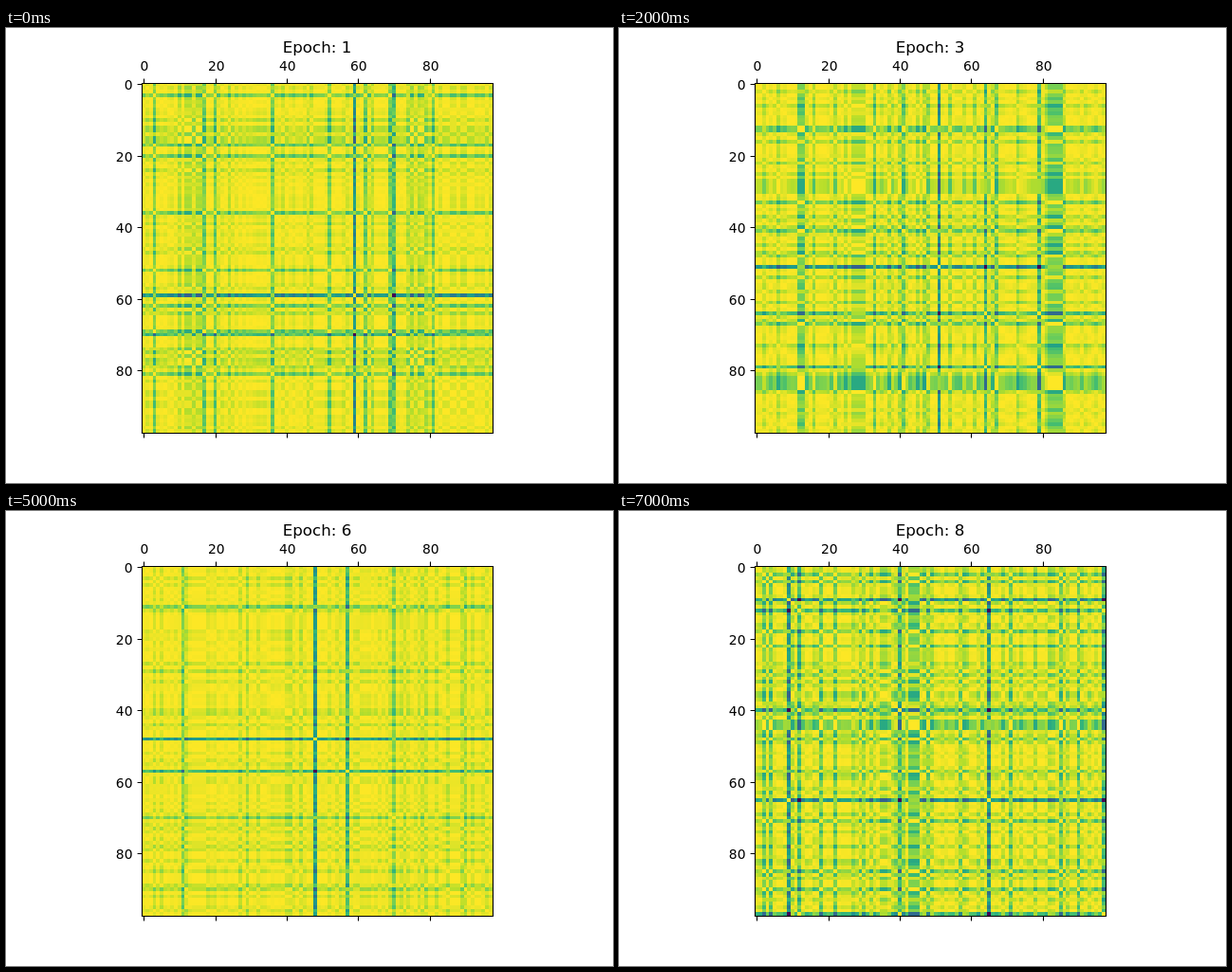
An HTML page with a canvas that plays this animation: 640x480 px, repeating every 8000 ms.

```html
<!DOCTYPE html>
<html lang="en">
<head>
<meta charset="utf-8">
<title>Similarity matrix by epoch</title>
<style>
  html, body { margin: 0; width: 100%; height: 100%; overflow: hidden; background: #fff; }
  canvas, svg { position: absolute; left: 0; top: 0; }
  text { font: 13.89px "DejaVu Sans", sans-serif; text-anchor: middle; }
  #title { font-size: 16.67px; }
  path { stroke: #000; stroke-width: 1.11; fill: none; }
</style>
</head>
<body>
<canvas id="matrix" width="640" height="480"></canvas>
<svg id="axes" width="640" height="480">
  <text id="title" x="328" y="26"></text>
  <path d="M143.5 58.5H513.5V427.5H143.5Z" stroke-linejoin="miter"/>
</svg>
<script>
const SIZE = 98, LEFT = 143.2, TOP = 57.6, CELL = 369.6 / SIZE, EPOCH_MS = 1000;
const VIRIDIS = ['440154', '482878', '3e4989', '31688e', '26828e',
                 '1f9e89', '35b779', '6ece58', 'b5de2b', 'fde725']
  .map(hex => hex.match(/../g).map(pair => parseInt(pair, 16)));

// Samples that stand out in each epoch, grouped by their offset in LEVELS
const LEVELS = [1, 0.55, -0.35, -0.75];
const EPOCHS = [
  { spread: 0.32, groups: [[59], [3, 17, 20, 36, 52, 62, 69, 81], [10, 12, 13, 15, 16, 75, 77], [70]] },
  { spread: 0.34, groups: [[22], [45, 73], [34, 88], [61]] },
  { spread: 0.42, groups: [[51], [12, 13, 33, 41, 67, 82, 83, 84, 85], [6, 25, 27, 28, 29, 30, 37, 86], [64, 79]] },
  { spread: 0.28, groups: [[14, 31], [20, 26, 42], [6, 25, 54, 62, 71, 75, 76, 83, 84, 92, 93, 94], [59]] },
  { spread: 0.36, groups: [[8, 59, 67], [16, 22, 33, 35, 71, 72, 73], [26, 39, 52, 78, 86, 91, 94], [97]] },
  { spread: 0.3, groups: [[48], [11, 70], [29, 90], [57]] },
  { spread: 0.26, groups: [[7, 79], [37, 51], [20, 26, 63, 91, 93, 94], [14, 67, 89]] },
  { spread: 0.42, groups: [[9, 65], [2, 4, 18, 22, 43, 44, 45, 71, 85, 90], [10, 35, 36, 47, 49, 58, 78, 82], [12, 40, 97]] }
];

function randomFrom(seed) {
  return () => {
    seed = (seed * 1664525 + 1013904223) >>> 0;
    return seed / 2 ** 32;
  };
}

function samplePositions(epoch) {
  const random = randomFrom(epoch * 7919 + 17);
  const { spread, groups } = EPOCHS[epoch];
  const positions = Array.from({ length: SIZE }, () => {
    const u = random() * 2 - 1;
    return spread * u * Math.abs(u);
  });
  groups.forEach((group, level) => group.forEach(i => positions[i] = LEVELS[level]));
  return positions;
}

function color(value) {
  const scaled = value * (VIRIDIS.length - 1);
  const low = Math.min(Math.floor(scaled), VIRIDIS.length - 2);
  const mix = VIRIDIS[low].map((c, k) => Math.round(c + (VIRIDIS[low + 1][k] - c) * (scaled - low)));
  return `rgb(${mix})`;
}

const ctx = document.getElementById('matrix').getContext('2d');
const axes = document.getElementById('axes');
const title = document.getElementById('title');
const edge = (start, i) => Math.round(start + i * CELL);

function drawMatrix(epoch) {
  const positions = samplePositions(epoch);
  const range = Math.max(...positions) - Math.min(...positions);
  for (let row = 0; row < SIZE; row++) {
    const y = edge(TOP, row), height = edge(TOP, row + 1) - y;
    for (let col = 0; col < SIZE; col++) {
      const x = edge(LEFT, col), width = edge(LEFT, col + 1) - x;
      const distance = Math.abs(positions[row] - positions[col]) / range;
      ctx.fillStyle = color(1 - distance ** 1.4);
      ctx.fillRect(x, y, width, height);
    }
  }
  title.textContent = `Epoch: ${epoch + 1}`;
}

function drawTicks() {
  let markup = '', ticks = '';
  for (let n = 0; n < SIZE; n += 20) {
    const x = edge(LEFT, n + 0.5) + 0.5, y = edge(TOP, n + 0.5) + 0.5;
    ticks += `M${x} 58.5v-4.9M${x} 427.5v4.9M143.5 ${y}h-4.9`;
    markup += `<text x="${x + 0.3}" y="45">${n}</text>
      <text x="133.5" y="${y + 5}" style="text-anchor:end">${n}</text>`;
  }
  axes.insertAdjacentHTML('beforeend', `${markup}<path d="${ticks}"/>`);
}

let shown = -1;
function tick() {
  const epoch = Math.floor(performance.now() / EPOCH_MS) % EPOCHS.length;
  if (epoch !== shown) drawMatrix(shown = epoch);
  requestAnimationFrame(tick);
}

drawTicks();
tick();
</script>
</body>
</html>
```
